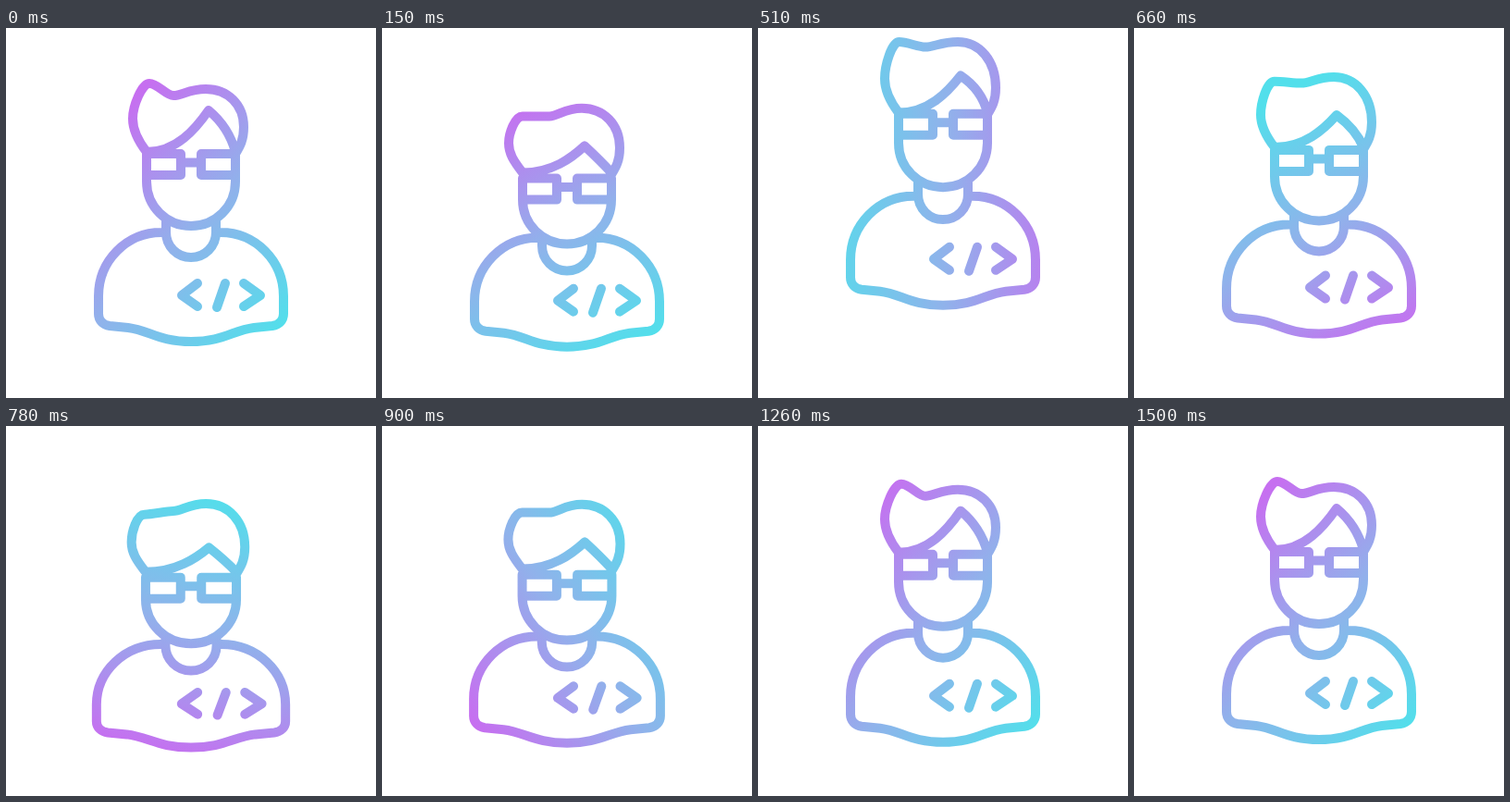
Write an HTML page with a canvas that moves like this. It is 400x400 px and loops after 3.53 s.

```html
<!DOCTYPE html>
<html lang="en">
<head>
<meta charset="utf-8">
<title>Developer</title>
<style>
  html, body { margin: 0; width: 100%; height: 100%; overflow: hidden; background: #fff; }
  canvas { display: block; width: 400px; height: 400px; }
</style>
</head>
<body>
<canvas id="stage"></canvas>
<script>
const LOOP = 3530, STEP = 30, END = 1500;

const canvas = document.getElementById('stage');
const ctx = canvas.getContext('2d');
const dpr = window.devicePixelRatio || 1;
canvas.width = canvas.height = 400 * dpr;
ctx.scale(dpr, dpr);
ctx.lineWidth = 10;
ctx.lineCap = ctx.lineJoin = 'round';

// Cosine easing between [time, value] turning points
function wave(...points) {
  return t => {
    const next = points.findIndex(p => p[0] > t);
    if (next < 0) return points[points.length - 1][1];
    if (next === 0) return points[0][1];
    const [t0, a] = points[next - 1], [t1, b] = points[next];
    return a + (b - a) * (1 - Math.cos(Math.PI * (t - t0) / (t1 - t0))) / 2;
  };
}

// Crouch, leap, landing, settling
const lift = wave([30, 0], [235, 9], [440, -44], [800, 9], [1020, -3], [1200, 3], [END, 0]);
// How far the head sinks into the shoulders
const nod = wave([30, 0], [170, 22], [360, -4], [540, -4], [860, 23], [1060, 0]);
// Widening of the figure at the low points
const widen = wave([150, 0], [235, 0.019], [320, 0], [700, 0], [810, 0.026], [960, 0]);
// Hair flattening in the air
const flop = t => t > 150 && t < 900 ? Math.sin(Math.PI * (t - 150) / 750) : 0;

function gradient(t) {
  const u = 1 - (1 - t / END) ** 1.3;
  const turn = u * u * (3 - 2 * u);
  const a = Math.PI * (1.25 + 2 * turn);
  const x = 145 * Math.cos(a), y = 145 * Math.sin(a);
  const g = ctx.createLinearGradient(203 + x, 216 + y, 203 - x, 216 - y);
  g.addColorStop(0, '#c66ff0');
  g.addColorStop(0.5, '#90b2eb');
  g.addColorStop(1, '#52dfeb');
  return g;
}

const BODY = `M171 221H168C130 221 100 252 100 290V309C100 316 105 321 112 322
  L132 324C155 327 166 339 200 339C234 339 245 327 268 324L288 322
  C295 321 300 316 300 309V290C300 252 270 221 232 221H229
  M207 276L190 289L207 301M257 276L275 289L257 301M237 276L228 302`;

function facePath(y, sink) {
  const chin = 214 + y + sink * 0.66, jaw = chin - 48;
  const collar = 248 + y + sink * 0.42, neck = collar - 27;
  const lens = 136 + y + sink;
  return `M152 ${lens}V${jaw}C152 ${chin - 21} 173.5 ${chin} 200 ${chin}
    C226.5 ${chin} 248 ${chin - 21} 248 ${jaw}V${lens}
    M173 ${chin - 8}V${neck}C173 ${collar - 12} 185 ${collar} 200 ${collar}
    C215 ${collar} 227 ${collar - 12} 227 ${neck}V${chin - 8}
    M152 ${lens}H189V${lens + 23}H152ZM211 ${lens}H248V${lens + 23}H211Z
    M189 ${lens + 9.5}H211`;
}

function hairPath(y, sink, flat) {
  const base = 134 + y + sink * 0.8;
  const side = base - 36 + sink * 0.2, back = base - 27;
  const tip = 60 + y + sink * 1.42, tipX = 155 - sink * 0.15 - flat * 3;
  const valley = 73 + y + sink * 0.8 - flat * 10;
  const crown = 66 + y + sink * 0.72 - flat * 9;
  const apex = 89 + y + sink * 1.57 + flat * 8;
  const drop = base - apex, bow = 1 - sink / 22;
  return `M152 ${base}C142 ${base - 13} 137 ${side + 11} 137 ${side}
    C137 ${side - (side - tip) * 0.37} ${tipX - 8} ${tip} ${tipX} ${tip}
    C${tipX + 9} ${tip} 173 ${valley} 181 ${valley}
    C190 ${valley} 198 ${crown} 216 ${crown}
    C240 ${crown} 257 ${crown + (back - crown) * 0.42} 257 ${back}
    C257 ${back + 14} 253 ${base - 6} 248 ${base + 2}
    M152 ${base}C184 ${base} 205 ${base - drop * 0.55} 219 ${apex}
    C${229 + 3 * bow} ${apex + drop * (0.33 - 0.09 * bow)}
    ${239 + 4 * bow} ${apex + drop * (0.67 - 0.08 * bow)} 248 ${base}`;
}

function draw(t) {
  const y = lift(t), sink = nod(t), w = widen(t);
  const sx = 1 + w, sy = 1 - 2.5 * w, left = -200 * w;
  const figure = new Path2D();
  const add = (d, scale, top) =>
    figure.addPath(new Path2D(d), new DOMMatrix([sx, 0, 0, scale, left, top]));
  add(BODY, sy, 339 * (1 - sy) + y);
  add(facePath(y, sink), 1, 0);
  add(hairPath(y, sink, flop(t)), 1, 0);
  ctx.clearRect(0, 0, 400, 400);
  ctx.strokeStyle = gradient(t);
  ctx.stroke(figure);
}

const start = performance.now();
function tick() {
  const t = (performance.now() - start) % LOOP;
  draw(Math.min(END, Math.floor(t / STEP) * STEP));
  requestAnimationFrame(tick);
}
tick();
</script>
</body>
</html>
```
